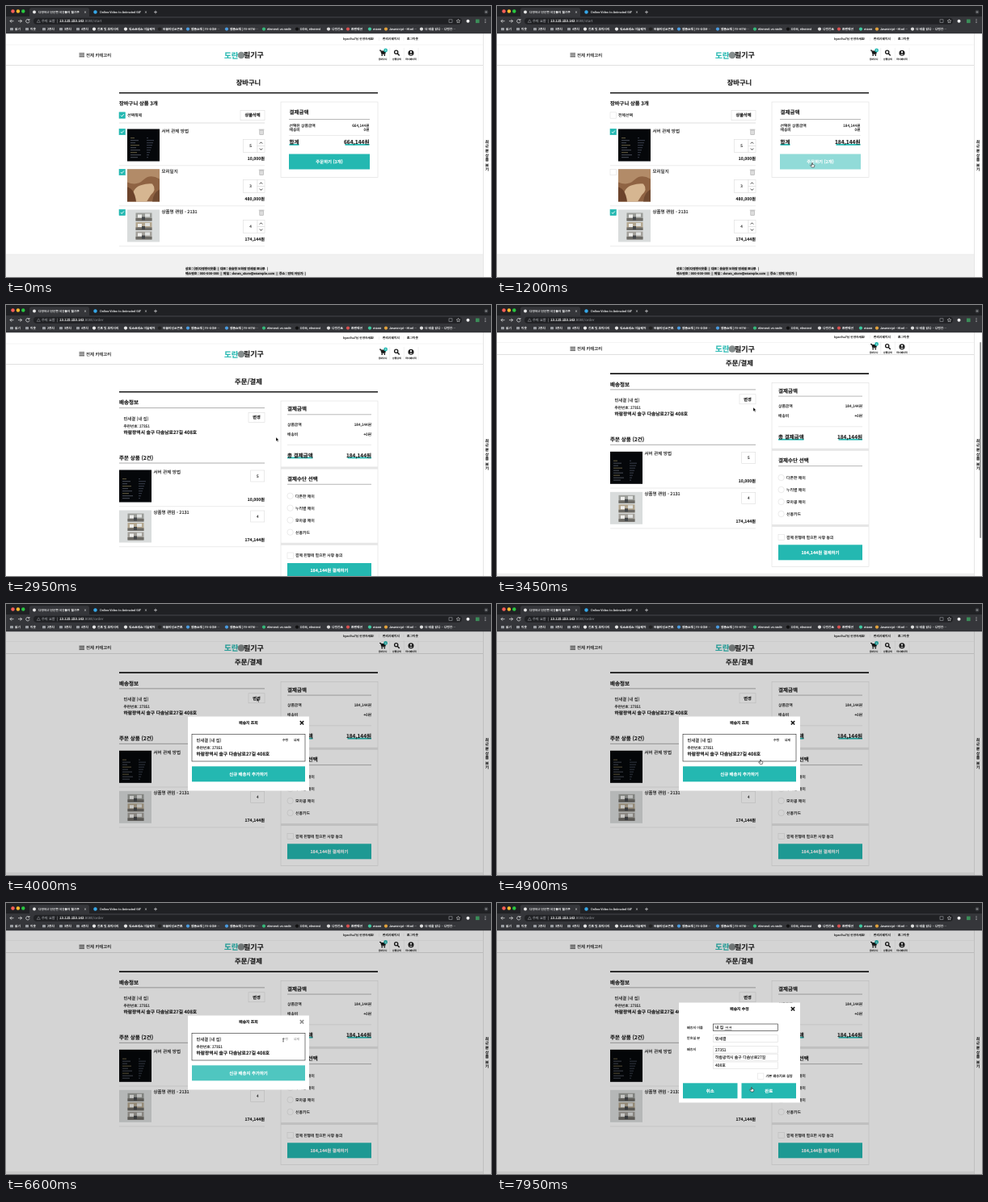
Recreate the animation shown at these times as an HTML page. Size 600 px wide and 336 px high, loop 8 s.

```html
<!DOCTYPE html>
<html lang="ko">
<head>
<meta charset="utf-8">
<title>장바구니</title>
<style>
html, body { margin: 0; width: 100%; height: 100%; overflow: hidden; background: #fff; }
svg { display: block; width: 100vw; height: 100vh; font-family: "Noto Sans CJK KR", "Noto Sans", sans-serif; }
text { white-space: pre; stroke-width: .12px; text-rendering: geometricPrecision; }
</style>
</head>
<body>
<svg id="stage" viewBox="0 0 600 336"></svg>
<script>
const TEAL = '#24b8b1', INK = '#1a1a1a', LOOP = 8000, STEP = 50;
const PERSON = '민새결', STREET = '하람광역시 솔구 다솜남로27길', UNIT = '408호', ZIP = '27351';
const UNCHECK = 500, ORDER = 1550, LIST = 3900, EDIT = 6750;

const clamp = v => Math.max(0, Math.min(1, v));
const ramp = (t, a, b) => clamp((t - a) / (b - a));
const smooth = p => p * p * (3 - 2 * p);

// Drawing helpers; text is placed by its vertical centre.
const rect = (x, y, w, h, fill, extra = '') =>
  `<rect x="${x}" y="${y}" width="${w}" height="${h}" fill="${fill}" ${extra}/>`;
const box = (x, y, w, h, stroke = '#ddd', fill = '#fff') =>
  rect(x, y, w, h, fill, `stroke="${stroke}" stroke-width=".6"`);
const circle = (x, y, r, fill, extra = '') => `<circle cx="${x}" cy="${y}" r="${r}" fill="${fill}" ${extra}/>`;
const path = (d, stroke, width = .8, fill = 'none') =>
  `<path d="${d}" stroke="${stroke}" stroke-width="${width}" fill="${fill}"/>`;
const hline = (x1, x2, y, color, width = .6) => path(`M${x1} ${y}H${x2}`, color, width);
const group = (content, attr) => `<g ${attr}>${content}</g>`;
const shift = (content, x, y) => group(content, `transform="translate(${x} ${y})"`);
const text = (x, y, s, size = 4.8, { bold, fill = INK, anchor = 'start' } = {}) =>
  `<text x="${x}" y="${y + size * .37}" font-size="${size}" font-weight="${bold ? 700 : 500}" fill="${fill}" stroke="${fill}" text-anchor="${anchor}">${s}</text>`;
const bold = (x, y, s, size, o) => text(x, y, s, size, { bold: true, ...o });
const mid = (x, y, s, size, o) => text(x, y, s, size, { anchor: 'middle', ...o });
const right = (x, y, s, size, o) => text(x, y, s, size, { anchor: 'end', ...o });
const button = (x, y, w, h, label, fade = 1) =>
  group(rect(x, y, w, h, TEAL), `opacity="${fade}"`) +
  mid(x + w / 2, y + h / 2, label, 5.4, { bold: true, fill: '#fff' });
const cross = (x, y, r, color, width) =>
  path(`M${x - r} ${y - r}l${2 * r} ${2 * r}m0 ${-2 * r}l${-2 * r} ${2 * r}`, color, width);
const check = (x, y, on) => box(x, y - 3.7, 7.4, 7.4, on ? TEAL : '#e2e2e2', on ? TEAL : '#fff') +
  (on ? path(`M${x + 1.9} ${y}l1.4 1.5 2.5-3`, '#fff', .9) : '');

const thumbs = {
  terminal() {
    let s = rect(0, 0, 40, 40, '#05070a');
    for (let i = 0; i < 9; i++) {
      const y = 11 + i * 3;
      s += rect(4, y, 5 + i * 5 % 9, .6, i % 3 ? '#777d8c' : '#a89a68') +
        rect(24, y, 2 + i * 7 % 8, .6, '#5d6479');
    }
    return s;
  },
  photo: () => rect(0, 0, 40, 40, '#8f6343') +
    path('M0 0H40V12Q28 5 20 13T0 16Z', 'none', 0, '#b28b68') +
    path('M5 40Q6 23 16 20T31 18Q37 25 29 32L24 40Z', 'none', 0, '#d6b691') +
    path('M0 22Q9 24 11 40H0Z', 'none', 0, '#6c432b') +
    path('M31 40Q32 29 40 25V40Z', 'none', 0, '#704a31'),
  rooms: () => rect(0, 0, 40, 40, '#d9dcdc') + [4, 15.5, 27].map((y, i) =>
    rect(10.5, y, 20, 10, ['#9a9c98', '#b3a68f', '#a3a09a'][i]) +
    rect(10.5, y + 6.5, 20, 3.5, '#6d6b66') + rect(13, y + 2, 5, 4, '#eeeeec') + rect(22, y + 1, 6, 4, '#dfe1e0') +
    rect(18, y + 5, 4, 4, '#44474a')).join('')
};

const items = [
  { name: '서버 관제 방법', image: 'terminal', count: 5, price: '10,000원' },
  { name: '모리일지', image: 'photo', count: 3, price: '480,000원' },
  { name: '상품명 랜덤 - 2131', image: 'rooms', count: 4, price: '174,144원' }
];

const pageTitle = s => mid(300, 95, s, 8.3, { bold: true }) + hline(140, 460, 107.8, INK, 1.6);

function footer(y) {
  return rect(0, y, 590, 80, '#f1f1f1') + hline(0, 590, y, '#ddd', .5) +
    rect(222, y + 15.5, 98, 5, '#d2d2d2') + rect(222, y + 21.5, 148, 5, '#d2d2d2') +
    bold(222, y + 18, '상호 : (주)다정한이웃들  |  대표 : 윤슬찬 도하람 민새결 표나루  |', 3.8) +
    bold(222, y + 24, '팩스번호 : 000-000-000  |  메일 : doran_store@example.com  |  주소 : 언덕 어딘가  |', 3.9);
}

function cartItem(item, i, on) {
  return shift(
    check(140, 156, on) + shift(thumbs[item.image](), 150, 152.5) +
    text(192.5, 155, item.name, 5.5) +
    rect(313.8, 154, 4.6, 5.6, '#ddd', 'stroke="#aaa" stroke-width=".6"') + hline(312.8, 319.4, 153.2, '#aaa', .8) +
    box(293.5, 165.5, 17.5, 16) + mid(302.5, 173.5, item.count, 4.7) +
    box(311, 165.5, 9, 8) + box(311, 173.5, 9, 8) +
    path('M313.8 170.6l1.7-1.8 1.7 1.8M313.8 176.6l1.7 1.8 1.7-1.8', INK, .8) +
    right(320, 189, item.price, 5.1, { bold: true }) + hline(140, 320, 197.8, '#ddd'), 0, i * 50);
}

function cartPage(t) {
  const all = t < UNCHECK, total = all ? '664,144원' : '184,144원';
  return pageTitle('장바구니') +
    bold(140, 121, '장바구니 상품 3개', 6.3) +
    check(140, 135.5, all) + text(150, 135.5, all ? '선택해제' : '전체선택', 4.9) +
    box(290, 129.3, 30, 12.4) + mid(305, 135.5, '상품삭제', 5.2, { bold: true }) +
    hline(140, 320, 145, '#ccc') +
    items.map((item, i) => cartItem(item, i, all || i !== 1)).join('') +
    box(340, 119, 120, 93.5) + bold(350.5, 131.5, '결제금액', 6.5) + hline(350, 450, 140.5, '#888') +
    text(350.5, 148, '선택된 상품금액') + right(449.5, 148, total, 4.7) +
    text(350.5, 153.3, '배송비') + right(449.5, 153.3, '0원', 4.7) + hline(350, 450, 160.5, '#ddd') +
    rect(350.5, 171, 12, 1.8, TEAL) + rect(419.5, 171, 30, 1.8, TEAL) +
    bold(350.5, 169, '합계', 6.5) + right(449.5, 169, total, 6.6, { bold: true }) +
    button(350, 183.5, 100, 19, `주문하기 (${all ? 3 : 2}개)`, 1 - .5 * ramp(t, 950, 1150)) +
    footer(308);
}

function orderItem(item, y) {
  return shift(shift(thumbs[item.image](), 140, 0) + text(182.5, 2.5, item.name, 5.5) +
    box(302.7, .5, 17, 14) + mid(311.2, 7.5, item.count, 4.7) +
    right(320, 36.8, item.price, 5.1, { bold: true }) + hline(140, 320, 45.2, '#ddd'), 0, y);
}

const addressLines = (x, y) => text(x, y, `${PERSON} (내 집)`, 5.3) +
  text(x, y + 9, `우편번호: ${ZIP}`, 4.6) +
  bold(x, y + 17, `${STREET} ${UNIT}`, 5.75);

function orderPage() {
  const ways = ['다온한 페이', '누리별 페이', '모아콩 페이', '신용카드'];
  return pageTitle('주문/결제') +
    bold(140, 121, '배송정보', 6.5) + hline(140, 320, 127.6, '#777') +
    addressLines(145.5, 141) +
    box(300, 133.5, 20, 12) + mid(310, 139.5, '변경', 5.2, { bold: true }) +
    bold(140, 189.5, '주문 상품 (2건)', 6.5) + hline(140, 320, 196, '#777') +
    orderItem(items[0], 204.5) + orderItem(items[2], 254.5) +
    box(340, 119, 120, 228) + rect(340, 200.5, 120, 3, '#e6e6e6') + rect(340, 294.8, 120, 3, '#e6e6e6') +
    bold(348, 129, '결제금액', 6.5) + hline(348, 452, 135.8, '#888') +
    text(348, 148, '상품금액') + right(452, 148, '184,144원', 4.7) +
    text(348, 160.3, '배송비') + right(452, 160.3, '+0원', 4.7) + hline(348, 452, 173.5, '#ddd') +
    rect(348, 188.5, 31.5, 1.8, TEAL) + rect(422.5, 188.5, 29.5, 1.8, TEAL) +
    bold(348, 186.5, '총 결제금액', 6.5) + right(452, 186.5, '184,144원', 6.5, { bold: true }) +
    bold(348, 215.5, '결제수단 선택', 6.5) + hline(348, 452, 222.3, '#888') +
    ways.map((s, i) => circle(351.6, 236.7 + 15 * i, 3.7, '#fff', 'stroke="#ddd" stroke-width=".6"') +
      text(358, 236.7 + 15 * i, s, 4.9)).join('') +
    check(348, 310.7, false) + text(358, 310.7, '결제 진행에 필요한 사항 동의') +
    button(348, 320, 104, 19, '184,144원 결제하기') + footer(356);
}

function header(p) {
  const icons = path('M462 55h1.6l1.2 4.3h4l.8-3.3h-5.4', INK, 1.1, INK) + circle(465.2, 61, .9, INK) + circle(468.3, 61, .9, INK) +
    circle(469.6, 55, 2.4, TEAL) + mid(469.6, 55, '3', 3, { fill: '#fff' }) +
    circle(482.7, 57.3, 2.1, 'none', `stroke="${INK}" stroke-width="1.3"`) + path('M484.2 58.8l2.5 2.6', INK, 1.5) +
    circle(501, 58.3, 3.5, INK) + circle(501, 57.1, 1.2, '#fff') + path('M498.9 60.6a2.2 1.7 0 0 1 4.2 0Z', 'none', 0, '#fff') +
    path('M474.7 52v16M492.3 52v16M510 52v16', '#e4e4e4', .5);
  const main = [59, 61, 63].map(y => hline(90.5, 97, y - .2, INK, .9)).join('') +
    text(99, 60.8, '전체 카테고리', 5.4) +
    bold(270, 61, '도란', 9.6, { fill: TEAL }) + circle(291, 61, 4.3, '#858c8c') + bold(294, 61, '필기구', 9) +
    icons + [[466, '장바구니'], [483.3, '상품검색'], [501, '마이페이지']].map(([x, s]) => mid(x, 65.7, s, 2.9)).join('');
  const top = 48 - 1.5 * p, bottom = 73.5 - 12 * p;
  return rect(0, 34, 590, bottom - 34, '#fff') + hline(0, 590, top, '#e8e8e8', .5) + hline(0, 590, bottom, '#ccc', .6) +
    shift(text(417, 41, 'byeolha7님 안녕하세요!', 3.7) + text(466, 41, '관리자페이지', 3.8) + text(496, 41, '로그아웃', 3.8) +
      path('M461.5 39v4M492 39v4', '#ddd', .4), 0, -1.5 * p) +
    shift(main, 0, -6.5 * p);
}

function sidebar() {
  return rect(590, 34, 10, 302, '#fff') + path('M590.5 34V336', '#ccc', .5) +
    [...'최근본상품보기'].map((c, i) => mid(595, [168, 173, 179.5, 185.5, 190.5, 197, 202][i], c, 4.5, { bold: true })).join('');
}

function browser(route) {
  const light = '#f1f2f3', dim = '#9b9ea3';
  const bookmarks = [
    [5, '읽기'], [24, '이웃'], [45, '2주차'], [66, '3주차'], [87, '4주차'], [107, '힌트 및 모의자리'],
    [146, '익스프레스 미들웨어'], [188, '버블라임코튼트'], [223, '웹풀스택 | FE-DOM…'], [271, '웹풀스택 | FE-HTM…'],
    [317, 'element vs node'], [358, 'DOM, element'], [397, '다정한프'], [421, '트랜잭션'], [448, 'mano'],
    [468, 'Javascript - Html…'], [512, '더 배울 있다 – 다정한…']
  ];
  const tints = ['#e8e8e8', '#e8e8e8', '#222', '#4a9be0', '#4a9be0', '#35b779', '#111', '#ddd', '#d85050', '#40c9a0', '#e3a23c', '#ddd'];
  return rect(0, 0, 600, 14, '#202124') + rect(0, 13, 600, 21.2, '#35363a') +
    rect(29, 2.3, 74, 14, '#35363a', 'rx="2.5"') +
    ['#ff5f57', '#febc2e', '#28c840'].map((c, i) => circle(8.5 + 6.4 * i, 6.5, 2.2, c)).join('') +
    circle(35, 7.5, 2, '#e8e8e8') + text(40, 7.6, '다정하고 단단한 이웃들의 필기구', 3.7, { fill: light }) + cross(98, 7.6, 1.1, light, .5) +
    circle(110.5, 7.5, 2.2, '#35a7e8') + text(116, 7.6, 'Online Video to Animated GIF', 3.7, { fill: light }) +
    cross(173, 7.6, 1.1, light, .5) + path('M183 7.6h4m-2-2v4', light, .6) + circle(594, 7.5, 2.4, '#45474b') +
    path('M593 7l1 1 1-1', light, .5) +
    path('M9.5 18.7H5m2-2l-2 2 2 2M15 18.7h4.5m-2-2l2 2-2 2', light, .7) +
    path('M28.6 17.4a2.2 2.2 0 1 0 .4 1.8M29 16v1.6h-1.7', light, .7) +
    rect(34, 14.8, 530, 8, '#202124', 'rx="4"') +
    path('M40.3 16.8l2 3.6h-4Z', dim, .5) + text(44, 18.7, '주의 요함  |', 4.2, { fill: dim }) +
    text(66, 18.7, `13.125.153.143<tspan fill="${dim}" stroke="none">:8080/${route}</tspan>`, 4.4, { fill: '#fff' }) +
    box(548, 16.8, 4, 3.8, dim, 'none') +
    path('M559.5 16.4l.7 1.5 1.6.2-1.2 1.1.3 1.6-1.4-.8-1.4.8.3-1.6-1.2-1.1 1.6-.2Z', light, .5) +
    circle(571.5, 18.7, 2, light) + rect(581, 16.5, 4.6, 4.6, '#3b8d59') +
    [16.8, 18.7, 20.6].map(y => circle(593, y, .5, light)).join('') +
    bookmarks.map(([x, s], i) => (i < 5 ? rect(x, 27, 4, 3.2, dim, 'rx=".5"') : circle(x + 2, 28.6, 2.1, tints[i - 5])) +
      text(x + 6, 28.7, s, 3.8, { fill: light })).join('');
}

function listModal(t) {
  const fade = ramp(t, 6350, 6600);
  return rect(225, 139.5, 150, 92, '#fff') + mid(300, 147.2, '배송지 조회', 4.8, { bold: true }) +
    group(cross(366, 147.3, 2.2, INK, 1.5), `opacity="${1 - .5 * fade}"`) +
    box(230, 161.5, 140, 33.5, '#222') + addressLines(235.5, 169) +
    group(text(342, 169, '수정', 3.8) + text(355.7, 169, '삭제', 3.8), `opacity="${1 - .6 * fade}"`) +
    button(230, 201.3, 140, 19, '신규 배송지 추가하기', 1 - .2 * fade);
}

function editModal(t) {
  const typed = t >= 7500 ? ' ㅋㅋ' : t >= 7300 ? ' ㅋ' : '';
  const fields = [[150, '내 집' + typed], [163.7, PERSON], [177.5, ZIP], [187.2, STREET], [197, UNIT]];
  return rect(225, 123.5, 150, 124, '#fff') + mid(300, 131.2, '배송지 수정', 4.8, { bold: true }) +
    cross(366, 131.3, 2.2, INK, 1.5) +
    text(235, 154.3, '배송지 이름', 4.05) + text(235, 168, '받으실 분', 4.05) + text(235, 181.8, '배송지', 4.05) +
    fields.map(([y, s], i) => box(267.3, y, 80.4, 8.6, i || t < 7100 ? '#ddd' : '#222') + text(270, y + 4.3, s, 4.9)).join('') +
    (typed ? hline(281.5, 281.5 + 4.5 * (typed.length - 1), 157.2, INK, .4) : '') +
    check(322.5, 214.8, false) + text(332.5, 214.8, '기본 배송지로 설정', 4.2) +
    button(230, 223.3, 67.5, 19, '취소') + button(302.5, 223.3, 67.5, 19, '완료');
}

const pointers = {
  arrow: path('M0-2.5v6l1.4-1.3 1 2.2 1-.5-1-2.1h1.9Z', '#fff', .4, '#000'),
  hand: path('M-.6-2.8q.7-.6 1.2 0v2.2l2.2.6q.8.4.5 1.4l-.7 2.1h-3.4l-2.1-2.7q.1-1 1.1-.5l1.2.9Z', '#000', .6, '#fff'),
  beam: path('M-.8-2.5q.8 0 .8.7v3.6q0 .7-.8.7M.8-2.5q-.8 0-.8.7M.8 2.5q-.8 0-.8-.7', '#000', .6)
};
const moves = [
  [100, 165, 220, 'arrow'], [350, 144, 206, 'hand'], [600, 144, 206, 'arrow'], [1000, 388, 197, 'hand'], [1150, 390, 197, 'hand'],
  [1600, 390, 197, 'arrow'], [2300, 350, 174, 'arrow'], [2950, 334, 166, 'arrow'], [3450, 317, 129, 'arrow'],
  [3700, 310, 117, 'hand'], [3950, 310, 117, 'arrow'], [4650, 326, 195.5, 'hand'], [5700, 326, 195.5, 'hand'],
  [6500, 343, 170, 'beam'], [6750, 343, 170, 'arrow'], [7050, 304, 155, 'beam'], [7550, 304, 155, 'arrow'],
  [7850, 315, 231, 'hand'], [8000, 315, 231, 'hand']
];

function pointer(t) {
  const i = moves.findIndex(m => m[0] > t);
  if (i < 1) return '';
  const [t0, x0, y0, kind] = moves[i - 1], [t1, x1, y1] = moves[i];
  const p = smooth(ramp(t, t0, t1));
  return shift(group(pointers[kind], 'transform="scale(.85)"'), x0 + (x1 - x0) * p, y0 + (y1 - y0) * p);
}

function scene(t) {
  const ordering = t >= ORDER, scrolled = smooth(ramp(t, 3000, 3400));
  const thumb = ordering && t >= 3000 && t < LIST ? rect(597.3, 36 + 10 * scrolled, 1.6, 243, '#888', 'rx=".8"') : '';
  const modal = t < LIST ? '' : rect(0, 34, 600, 302, '#000', 'opacity=".17"') + (t < EDIT ? listModal(t) : editModal(t));
  return rect(0, 0, 600, 336, '#fff') +
    shift(ordering ? orderPage() : cartPage(t), 0, -22.7 * scrolled) +
    header(scrolled) + sidebar() + thumb + modal + browser(ordering ? 'order' : 'start') + pointer(t);
}

const stage = document.getElementById('stage');
const start = performance.now();
let shown = -1;
function tick() {
  const t = Math.floor((performance.now() - start) % LOOP / STEP) * STEP;
  if (t !== shown) stage.innerHTML = scene(shown = t);
  requestAnimationFrame(tick);
}
tick();
</script>
</body>
</html>
```
